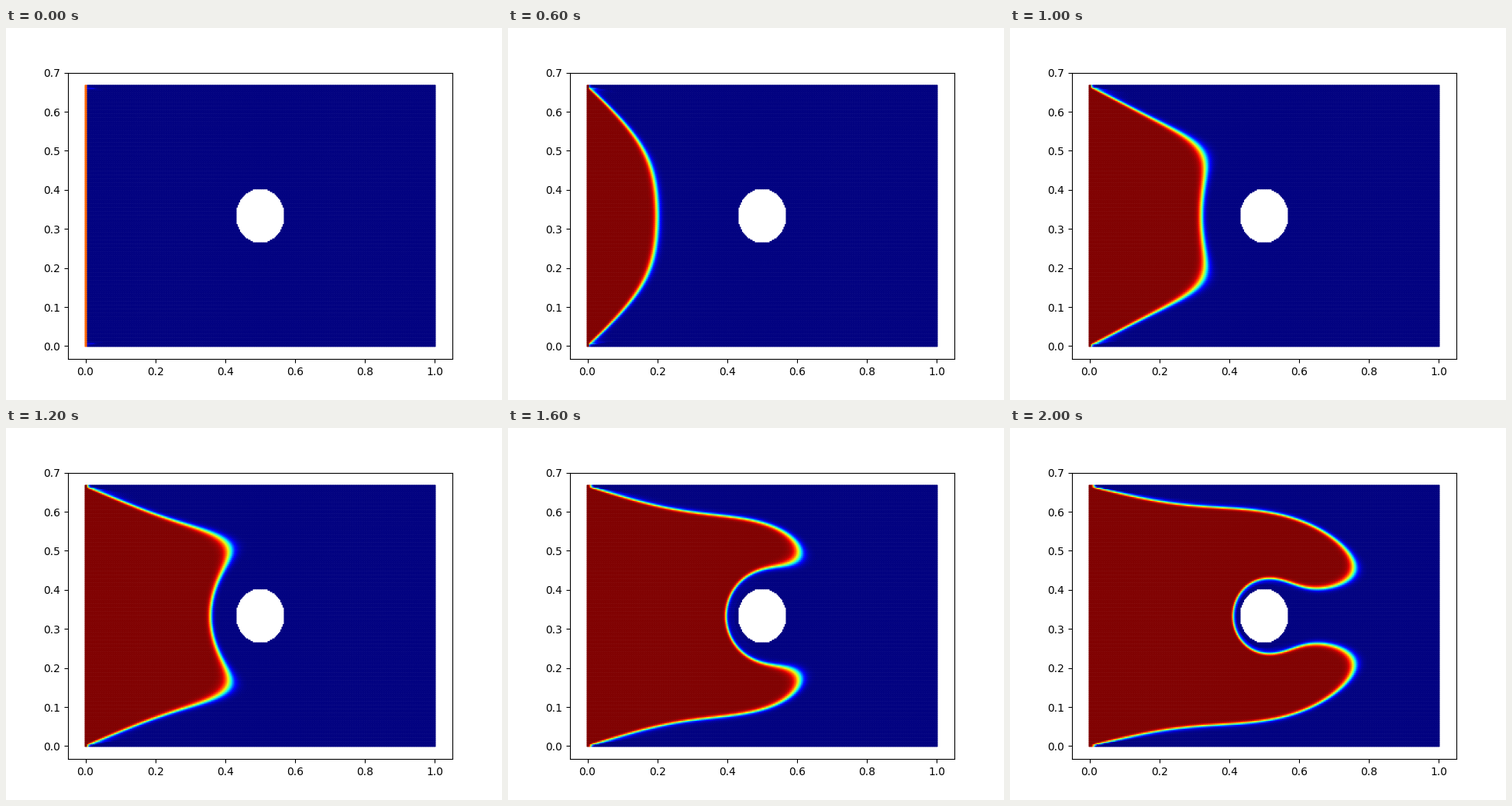
Recreate the animation shown at these times as a matplotlib script. Size 640 by 480 pixels, loop 2.2 s.

```python
import numpy as np
import matplotlib.pyplot as plt
from matplotlib.animation import FuncAnimation

FRAMES, INTERVAL = 11, 200
NX, NY = 300, 200    # cells along and across the channel
H = 1 / 3            # half height of the channel
R = 0.07             # cylinder radius
SPEED = 0.084        # inflow speed on the axis, per frame
LAG = 0.5            # delay before the front leaves the inlet
ORDER = 21


def stokes_basis(x, y):
    """Velocities of symmetric Stokes solutions around (0, 0)."""
    z = x + 1j * y
    r2 = x * x + y * y
    us, vs = [], []
    for k in range(-ORDER, ORDER + 1, 2):
        size = R if k < 0 else 0.6
        f = (z / size) ** k
        df = k * f / z
        us.append(df.real)
        vs.append(-df.imag)
        if k == -1:
            us.append(np.log(r2) / 2 + y * y / r2)
            vs.append(-x * y / r2)
        else:
            us.append(2 * y * f.imag + r2 * df.real)
            vs.append(-2 * x * f.imag - r2 * df.imag)
    return np.array(us).T, np.array(vs).T


def solve_flow():
    """Fit the basis to walls, inlet, outlet and cylinder."""
    s = np.linspace(0, 1, 160)
    a = s * np.pi
    x = np.concatenate([s - 0.5, np.full(160, -0.5), np.full(160, 0.5), R * np.cos(a)])
    y = np.concatenate([np.full(160, H), s * H, s * H, R * np.sin(a)])
    u = np.where(np.abs(x) > 0.4999, 1 - (y / H) ** 2, 0)
    bu, bv = stokes_basis(x, y)
    m = np.vstack([bu, bv])
    scale = np.abs(m).max(axis=0)
    coef = np.linalg.lstsq(m / scale, np.concatenate([u, 0 * u]), rcond=1e-12)[0]
    return coef / scale


def velocity_table(nx=400, ny=134):
    coef = solve_flow()
    x, y = np.meshgrid(np.linspace(-0.5, 0.5, nx + 1), np.linspace(0, H, ny + 1))
    solid = np.hypot(x, y) < R
    x[solid] = R
    bu, bv = stokes_basis(x.ravel(), y.ravel())
    u, v = (((b @ coef).reshape(x.shape)) * ~solid for b in (bu, bv))
    return np.stack([u, v]) * SPEED


def sample(table, x, y):
    ny, nx = table.shape[1] - 1, table.shape[2] - 1
    gx = np.clip(x * nx, 0, nx - 1e-6)
    gy = np.clip(y / H * ny, 0, ny - 1.1)   # lets the wall layer creep
    i, j = gx.astype(int), gy.astype(int)
    p, q = gx - i, gy - j
    return ((1 - q) * ((1 - p) * table[:, j, i] + p * table[:, j, i + 1])
            + q * ((1 - p) * table[:, j + 1, i] + p * table[:, j + 1, i + 1]))


def arrival_times(x, y, dt=0.08):
    """Trace every point upstream until it leaves through the inlet."""
    table = velocity_table()
    x, y = x.copy(), y.copy()
    time = np.full(x.shape, FRAMES + 3.0)
    time[x <= 0] = 0
    live = np.flatnonzero(x > 0)
    for n in range(int((FRAMES + 3) / dt)):
        px, py = x[live], y[live]
        u, v = sample(table, px, py)
        u, v = sample(table, px - u * dt / 2, np.abs(py - v * dt / 2))
        qx = px - u * dt
        out = qx <= 0
        time[live[out]] = dt * (n + px[out] / (px[out] - qx[out]))
        x[live], y[live] = qx, np.abs(py - v * dt)
        live = live[~out]
    return time


gx, gy = np.meshgrid(np.linspace(0, 1, NX + 1), np.linspace(-H, H, NY + 1))
upper = gy >= -1e-9
half = arrival_times(gx[upper], gy[upper]).reshape(-1, NX + 1)
arrival = np.vstack([half[:0:-1], half])

# The front is blurred both in time and over a few cells.
dy, dx = np.gradient(arrival)
width = np.hypot(np.minimum(0.04 + 0.03 * arrival, 0.18), 1.3 * np.hypot(dx, dy))
inlet = gx < 1.5 / NX
arrival = np.where(inlet, -0.035, arrival + LAG)
width[inlet] = 0.05

fluid = np.hypot(gx - 0.5, gy) >= R - 1e-9
arrival, width = arrival[fluid], width[fluid]


def fill(i):
    return 0.5 + 0.5 * np.tanh((i - arrival) / width)


fig, ax = plt.subplots(figsize=(6.4, 4.8), dpi=100)
dots = ax.scatter(gx[fluid], gy[fluid] + H, s=0.5, c=fill(0), cmap="jet", vmin=0, vmax=1)
ax.set_xlim(-0.05, 1.05)
ax.set_ylim(-0.1 * H, 2.1 * H)


def draw(i):
    dots.set_array(fill(i))
    return dots,


anim = FuncAnimation(fig, draw, frames=FRAMES, interval=INTERVAL, repeat=True)
plt.show()
```
